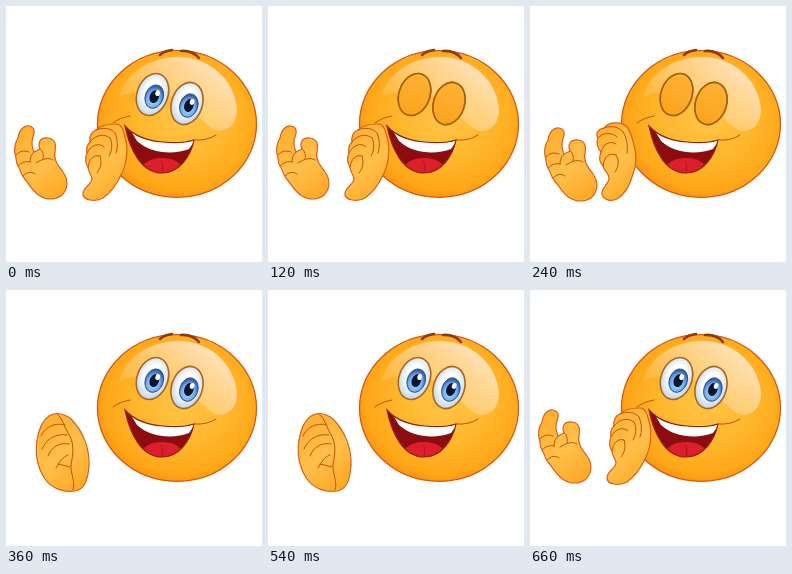
Animation of 256 by 256 pixels, one loop 780 ms. Source, as an HTML page:

```html
<!DOCTYPE html>
<html lang="en">
<head>
<meta charset="utf-8">
<title>Clapping smiley</title>
<style>
  html, body { margin: 0; width: 100%; height: 100%; overflow: hidden; background: #fff; }
  svg { display: block; width: 100%; height: 100%; }
  .line { fill: none; stroke: #c4500c; stroke-width: 1; stroke-linecap: round; stroke-linejoin: round; }
  .hand { fill: url(#skin); stroke: #d9601a; stroke-width: 1.2; stroke-linejoin: round; }
</style>
</head>
<body>
<svg viewBox="0 0 256 256">
  <defs>
    <radialGradient id="face" cx=".54" cy=".45" r=".6">
      <stop offset="0" stop-color="#ffc648"/>
      <stop offset=".5" stop-color="#ffb62c"/>
      <stop offset=".84" stop-color="#ffa618"/>
      <stop offset="1" stop-color="#f98a10"/>
    </radialGradient>
    <linearGradient id="gloss" x1=".85" y1=".2" x2=".1" y2=".8">
      <stop offset="0" stop-color="#ffe9d2" stop-opacity=".85"/>
      <stop offset=".5" stop-color="#ffe2b8" stop-opacity=".5"/>
      <stop offset="1" stop-color="#ffd890" stop-opacity=".15"/>
    </linearGradient>
    <linearGradient id="skin" x1=".2" y1="0" x2=".7" y2="1">
      <stop offset="0" stop-color="#ffae30"/>
      <stop offset=".55" stop-color="#ffc04a"/>
      <stop offset="1" stop-color="#ffaa28"/>
    </linearGradient>
    <radialGradient id="white" cx=".5" cy=".45" r=".56">
      <stop offset=".5" stop-color="#fff"/>
      <stop offset="1" stop-color="#b9d2ee"/>
    </radialGradient>
    <radialGradient id="iris" cx=".5" cy=".62" r=".55">
      <stop offset="0" stop-color="#b5e0ff"/>
      <stop offset=".65" stop-color="#74b0ee"/>
      <stop offset="1" stop-color="#3560ae"/>
    </radialGradient>
    <linearGradient id="lid" x2="0" y2="1">
      <stop offset="0" stop-color="#ffb236"/>
      <stop offset="1" stop-color="#faa41c"/>
    </linearGradient>
    <linearGradient id="throat" x2="0" y2="1">
      <stop offset="0" stop-color="#8a0c0e"/>
      <stop offset="1" stop-color="#8e0c12"/>
    </linearGradient>
    <clipPath id="mouthClip">
      <path id="mouth" d="M119 120C128 130 143 135 157 136C168 137 179 137 188 134C185 150 173 167 156 167C136 167 124 145 119 120Z"/>
    </clipPath>
    <clipPath id="lidClip"><rect id="lidArea" x="-25" y="-24" width="50" height="0"/></clipPath>
    <g id="eye">
      <ellipse rx="15.4" ry="21.6" fill="url(#white)" stroke="#b0641a" stroke-width="1.6"/>
      <g transform="translate(2.4 1.4)">
        <ellipse rx="9" ry="12" fill="url(#iris)" stroke="#2c4c96" stroke-width=".9"/>
        <ellipse rx="4.6" ry="6.6" fill="#0c1430"/>
        <ellipse cx="2" cy="-4.5" rx="2.3" ry="3" fill="#fff"/>
      </g>
      <ellipse rx="15.4" ry="21.6" fill="url(#lid)" stroke="#a85c08" stroke-width="1.6" clip-path="url(#lidClip)"/>
      <path id="lidEdge" class="line"/>
    </g>
    <g id="leftHand">
      <path class="hand" d="M12 132C13 124 18 119 23 120C29 121 29 126 27 131C25 136 26 141 28 146L34 143C31 136 35 131 42 132C50 133 50 139 49 146C47 153 52 159 57 166C63 174 62 184 55 190C49 194 40 194 34 190C27 186 24 179 18 172C14 167 15 164 12 160C9 156 11 152 9 148C8 143 9 136 12 132Z"/>
      <path class="line" d="M34 143C37 145 38 149 37 153M28 146C25 149 24 152 24 156M30 157C36 153 42 151 47 154M10 149C13 145 18 144 23 146M12 160C16 156 20 155 24 156M17 170C21 166 25 165 29 168"/>
    </g>
  </defs>

  <ellipse cx="171" cy="118" rx="79.5" ry="73.3" fill="url(#face)" stroke="#d9570c" stroke-width="1.3"/>
  <path fill="url(#gloss)" d="M113 92C118 68 143 52 170 51C204 50 229 75 231 103C231 118 223 125 212 125C197 122 184 92 151 86C136 84 122 86 113 92Z"/>
  <path d="M154 49Q158 45 166 44M175 45Q186 44 193 52" fill="none" stroke="#8e3b0a" stroke-width="2.6" stroke-linecap="round"/>
  <use href="#eye" transform="translate(146.5 88.5) rotate(20)"/>
  <use href="#eye" transform="translate(181 97.5) rotate(18)"/>

  <g clip-path="url(#mouthClip)">
    <rect x="115" y="115" width="85" height="60" fill="url(#throat)"/>
    <ellipse cx="156" cy="163" rx="20" ry="11" fill="#dc1f2a"/>
    <path d="M155 155Q158 159 156 167" fill="none" stroke="#b01620"/>
    <path d="M125 125C137 134 162 138 190 133L183 143C168 149 145 148 131 135Z" fill="#fff"/>
  </g>
  <use href="#mouth" fill="none" stroke="#8e2508" stroke-width="1.2"/>
  <path class="line" d="M107 117Q113 112 124 110M188 134Q201 135 210 129"/>

  <g id="wide">
    <use href="#leftHand"/>
    <path class="hand" d="M77 187C78 181 85 179 86 173C86 169 82 166 82 161C79 157 79 151 81 147C80 142 82 138 84 136C83 130 86 125 90 124C95 119 104 118 110 118C116 118 117 124 119 131C123 144 120 160 115 169C111 178 104 187 97 192C90 196 76 195 77 187Z"/>
    <path class="line" d="M90 124C97 121 105 122 109 127M84 136C89 129 98 127 104 132M81 147C85 139 93 136 98 141M82 161C83 153 88 148 94 150M94 150C96 156 95 162 91 167M109 127C112 134 112 141 110 147M104 132C107 138 106 145 103 150"/>
  </g>
  <g id="near">
    <use href="#leftHand" transform="translate(6 2)"/>
    <path class="hand" d="M72 188C71 182 79 178 79 172C79 167 74 165 73 160C69 156 69 151 71 146C67 142 66 136 68 132C65 127 68 123 74 122C78 116 90 115 96 120C100 123 101 129 103 135C107 148 107 158 103 168C100 179 94 189 87 193C81 196 73 194 72 188Z"/>
    <path class="line" d="M74 122C82 119 89 121 93 126M68 132C73 126 82 126 87 131M71 146C73 138 80 134 86 138M73 160C74 151 79 146 86 149M86 149C90 155 88 162 85 166M93 126C97 132 98 140 97 147"/>
  </g>
  <g id="together">
    <path class="hand" d="M43 126C49 122 58 123 65 129C77 141 84 159 83 176C82 190 78 200 69 201C58 203 45 198 39 189C31 177 29 163 31 150C33 138 37 130 43 126Z"/>
    <path class="line" d="M52 125C57 129 58 136 62 143C69 153 67 165 65 174C64 183 70 192 67 200M59 135C49 132 39 137 35 146M61 145C50 143 40 149 36 159M63 154C54 152 45 157 42 166M50 178C54 172 56 167 62 165M52 174L64 177"/>
  </g>
</svg>
<script>
  const LOOP = 780;
  // start time, hand pose, how far the eyelids are shut
  const steps = [
    [0, "wide", 0],
    [60, "wide", .5],
    [120, "wide", 1],
    [240, "near", 1],
    [300, "together", .5],
    [360, "together", 0],
    [600, "near", 0],
    [660, "wide", 0]
  ];
  const byId = id => document.getElementById(id);
  const poses = ["wide", "near", "together"].map(byId);

  function draw(now) {
    const time = now % LOOP;
    const [, pose, shut] = steps.findLast(([start]) => start <= time);
    for (const hands of poses) hands.style.display = hands.id === pose ? "" : "none";
    byId("lidArea").setAttribute("height", 48 * shut);
    byId("lidEdge").setAttribute("d", shut > 0 && shut < 1 ? "M-15.4 0Q0 3 15.4 0" : "");
    requestAnimationFrame(draw);
  }
  draw(0);
</script>
</body>
</html>
```
